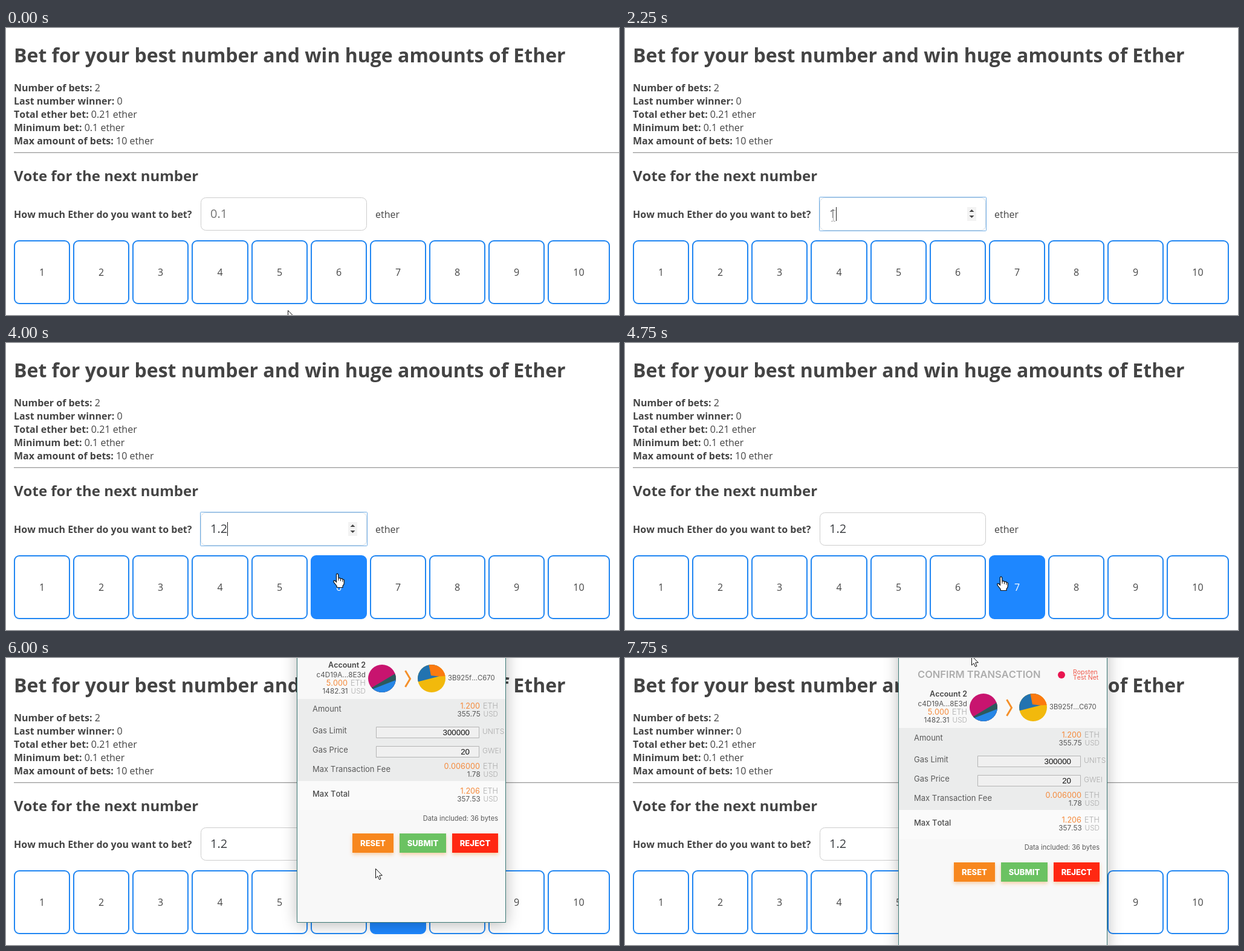
An HTML page with a canvas that plays this animation: 1014x476 px, repeating every 8000 ms.

```html
<!DOCTYPE html>
<html lang="en">
<head>
<meta charset="utf-8">
<title>Number bet</title>
<style>
html, body { margin: 0; width: 100%; height: 100%; overflow: hidden; background: #fff; }
canvas { display: block; }
</style>
</head>
<body>
<canvas id="stage" width="1014" height="476"></canvas>
<script>
const ctx = document.getElementById('stage').getContext('2d');
const LOOP = 8000, STEP = 250;
const PAGE = '"Open Sans", sans-serif', POP = 'Inter, sans-serif', FIELD = '"Liberation Sans", sans-serif';
const INK = '#444', BLUE = '#2086f2', ORANGE = '#f5893a', GREY = '#ababab';
ctx.fontKerning = 'none';

// Cursor keys: time, shape, x, y
const cursorKeys = [
  [0, 'arrow', 466, 468], [250, 'arrow', 386, 347], [500, 'beam', 380, 307],
  [750, 'beam', 344, 311], [3750, 'beam', 392, 322], [4000, 'hand', 548, 382],
  [4250, 'hand', 622, 387], [5250, 'arrow', 622, 387], [5750, 'arrow', 616, 362],
  [6000, 'arrow', 611, 349], [6250, 'arrow', 607, 190], [6500, 'arrow', 603, 24],
  [6750, 'none', 602, -50], [7750, 'arrow', 573, -4]
];
// Popup keys: time, x, y
const popupKeys = [[5250, 481.5, -48], [7250, 475.5, -40], [7500, 459.5, -14], [7750, 452.5, 0]];
const textKeys = [[0, ''], [2250, '1'], [2500, '1.'], [2750, '1.2']];
const hoverKeys = [[0, 0], [4000, 6], [4250, 7]];

const at = (keys, t) => keys.filter(k => k[0] <= t).pop();

function text(str, x, y, size, color, font = PAGE, weight = 400, align = 'left') {
  ctx.font = `${weight} ${size}px ${font}`;
  ctx.fillStyle = color;
  ctx.textAlign = align;
  ctx.fillText(str, x, y);
  return ctx.measureText(str).width;
}

function box(x, y, w, h, r, fill, stroke, line = 1) {
  ctx.beginPath();
  ctx.roundRect(x, y, w, h, r);
  if (fill) { ctx.fillStyle = fill; ctx.fill(); }
  if (stroke) { ctx.strokeStyle = stroke; ctx.lineWidth = line; ctx.stroke(); }
}

function poly(points, fill, stroke, width = 1, close = true) {
  ctx.beginPath();
  points.forEach(([x, y]) => ctx.lineTo(x, y));
  if (close) ctx.closePath();
  if (fill) { ctx.fillStyle = fill; ctx.fill(); }
  if (stroke) { ctx.strokeStyle = stroke; ctx.lineWidth = width; ctx.stroke(); }
}

function page(t) {
  text('Bet for your best number and win huge amounts of Ether', 13, 57, 32, INK, PAGE, 700);
  [['Number of bets:', '2'], ['Last number winner:', '0'], ['Total ether bet:', '0.21 ether'],
   ['Minimum bet:', '0.1 ether'], ['Max amount of bets:', '10 ether']].forEach(([label, value], i) => {
    const y = 105 + 22 * i;
    const w = text(label + ' ', 13, y, 16, INK, PAGE, 700);
    text(value, 13 + w, y, 16, INK);
  });
  ctx.fillStyle = '#999';
  ctx.fillRect(13, 206, 1001, 1);
  ctx.fillStyle = '#e4e4e4';
  ctx.fillRect(13, 207, 1001, 1);
  text('Vote for the next number', 13, 254, 24, INK, PAGE, 700);
  text('How much Ether do you want to bet?', 13, 315, 16, INK, PAGE, 700);
  text('ether', 611, 315, 16, INK);
  input(t);

  const hover = at(hoverKeys, t)[1];
  for (let n = 1; n <= 10; n++) {
    const left = 13 + 98.15 * (n - 1), x = Math.round(left);
    const w = Math.round(left + (n < 10 ? 93.1 : 102.6)) - x, on = n === hover;
    box(x + 1, 353, w - 2, 104, 8, on ? '#1e87ff' : '#fff', on ? '#1e87ff' : BLUE, 2);
    text(n, x + w / 2, 411, 16, on ? '#fff' : INK, PAGE, 400, 'center');
  }
}

function input(t) {
  const focus = t >= 750 && t < 4750;
  box(322.5, 281.5, 274, 54, 8, '#fff', focus ? '#d3dde6' : '#ccc');
  if (focus) box(321.5, 280.5, 276, 56, 1, null, '#6fade6');
  if (t >= 500 && t < 4750) {
    ctx.fillStyle = '#f3f3f3';
    ctx.fillRect(566, 297, 15, 23);
    poly([[569.5, 305], [577.5, 305], [573.5, 301]], '#444');
    poly([[569.5, 311], [577.5, 311], [573.5, 315]], '#444');
  }
  const value = at(textKeys, t)[1];
  const w = text(value || '0.1', 338, 315, 20, value ? '#3d4044' : '#757575');
  const since = t < 2250 ? t - 750 : t < 2750 ? 0 : t - 2750;
  if (focus && since % 1000 < 500) {
    ctx.fillStyle = '#222';
    ctx.fillRect(Math.floor(338 + (value ? w : 0)), 297, 1, 23);
  }
}

function disc(x, y, base, parts) {
  ctx.save();
  ctx.translate(x, y);
  ctx.beginPath();
  ctx.arc(0, 0, 23, 0, 7);
  ctx.clip();
  ctx.fillStyle = base;
  ctx.fillRect(-23, -23, 46, 46);
  parts.forEach(([color, points]) => poly(points, color));
  ctx.restore();
}

function amounts(right, y, eth, usd) {
  const sum = (value, unit, dy, size, color) => {
    const w = text(unit, right, y + dy, size, GREY, POP, 300, 'right');
    text(value, right - w - 5, y + dy, size, color, POP, 400, 'right');
  };
  sum(eth, 'ETH', 0, 12.7, ORANGE);
  sum(usd, 'USD', 13, 11.7, '#555');
}

function field(y, label, value, unit) {
  text(label, 25, y, 13, '#5a5a5a', POP);
  box(130.5, y - 10.5, 170, 18, 0, '#f0f0f0', '#b4b4b4');
  text(value, 285, y + 3, 13.33, '#111', FIELD, 400, 'right');
  text(unit, 306, y + 1, 12, GREY, POP, 300);
}

function button(x, w, label, color) {
  ctx.save();
  ctx.shadowColor = 'rgba(247,134,28,.36)';
  ctx.shadowBlur = 6;
  ctx.shadowOffsetY = 3;
  box(x, 339, w, 32, 0, color);
  ctx.restore();
  text(label, x + w / 2, 360, 13, '#fff', POP, 800, 'center');
}

function popup(t) {
  const key = at(popupKeys, t);
  if (!key) return;
  ctx.save();
  ctx.translate(key[1], key[2]);
  ctx.save();
  ctx.shadowColor = 'rgba(0,0,0,.28)';
  ctx.shadowBlur = 24;
  ctx.shadowOffsetY = 3;
  box(0, -40, 345, 526.5, 0, '#f7f7f7');
  ctx.restore();
  box(0, -40, 345, 526.5, 0, '#f8f8f8', '#3c7875');
  ctx.translate(.5, 0);
  if (t >= 5500) transaction();
  ctx.restore();
}

function transaction() {
  text('CONFIRM TRANSACTION', 31, 33, 16.5, '#adadad', POP, 600);
  ctx.beginPath();
  ctx.arc(269, 28, 6, 0, 7);
  ctx.fillStyle = '#e91550';
  ctx.fill();
  text('Ropsten', 288, 27, 10.5, '#f0584a', POP);
  text('Test Net', 288, 36, 10.5, '#f0584a', POP);

  text('Account 2', 113, 64, 12.5, '#444', POP, 600, 'right');
  text('c4D19A...8E3d', 113, 80, 11.7, '#555', POP, 400, 'right');
  amounts(113, 94, '5.000', '1482.31');
  disc(140, 82, '#c8146f', [
    ['#2b5a5e', [[-27, 21], [27, -11], [27, 30], [-27, 30]]],
    ['#2686e6', [[-27, 22], [27, 1], [27, 30], [-27, 30]]]
  ]);
  poly([[178.5, 69], [186.5, 82.5], [178.5, 96]], null, '#f5902a', 3, false);
  disc(222, 82, '#f2b90c', [
    ['#2273b0', [[-25, 6], [12, -3.5], [12, -25], [-25, -25]]],
    ['#fb7a10', [[-5, -25], [-1, -5], [12, -3.5], [25, -4], [25, -25]]]
  ]);
  text('3B925f...C670', 249, 85, 11.3, '#555', POP);

  ctx.fillStyle = '#ebecec';
  ctx.fillRect(0, 116, 344, 136);
  text('Amount', 25, 137, 13, '#5a5a5a', POP);
  amounts(332, 132, '1.200', '355.75');
  field(173, 'Gas Limit', '300000', 'UNITS');
  field(205, 'Gas Price', '20', 'GWEI');
  text('Max Transaction Fee', 25, 237, 13, '#5a5a5a', POP);
  amounts(332, 232, '0.006000', '1.78');

  ctx.fillStyle = '#fafafa';
  ctx.fillRect(0, 252, 344, 48);
  text('Max Total', 25, 278, 13, '#4a4a4a', POP, 500);
  amounts(332, 273, '1.206', '357.53');
  text('Data included: 36 bytes', 332, 318, 11.1, '#5a5a5a', POP, 400, 'right');
  button(91, 68, 'RESET', '#f7871e');
  button(169, 77, 'SUBMIT', '#6bc262');
  button(256, 76, 'REJECT', '#ff2812');
}

const cursors = {
  none() {},
  arrow() {
    poly([[.5, .5], [.5, 16], [4, 12.7], [6.5, 18.5], [9, 17.4], [6.6, 11.8], [11.3, 11.6]], '#fff', '#111');
  },
  beam() {
    ctx.fillStyle = '#aaa';
    ctx.fillRect(0, -8, 1, 17);
    ctx.fillRect(-3, -9, 3, 1);
    ctx.fillRect(1, -9, 3, 1);
    ctx.fillRect(-3, 9, 3, 1);
    ctx.fillRect(1, 9, 3, 1);
  },
  hand() {
    poly([[-1.5, 1.5], [0, .5], [1.5, 1.5], [2, 8], [4.5, 7.7], [5.5, 9], [8, 8.7], [9, 10],
      [11, 10.5], [11.5, 12], [11, 18], [9, 21], [9, 23.5], [-.5, 23.5], [-1, 21], [-6, 14.5],
      [-6, 12.3], [-4, 12], [-1.5, 14.5]], '#fff', '#111', 1.2);
    [[2, 8], [5.5, 9], [9, 10]].forEach(([x, y]) => poly([[x, y], [x, y + 4]], null, '#111', 1, false));
  }
};

function draw(time) {
  const t = Math.floor(time % LOOP / STEP) * STEP;
  ctx.fillStyle = '#fff';
  ctx.fillRect(0, 0, 1014, 476);
  page(t);
  popup(t);
  const [, shape, x, y] = at(cursorKeys, t);
  ctx.save();
  ctx.translate(x, y);
  cursors[shape]();
  ctx.restore();
}

const start = performance.now();
function tick() {
  draw(performance.now() - start);
  requestAnimationFrame(tick);
}
tick();
</script>
</body>
</html>
```
